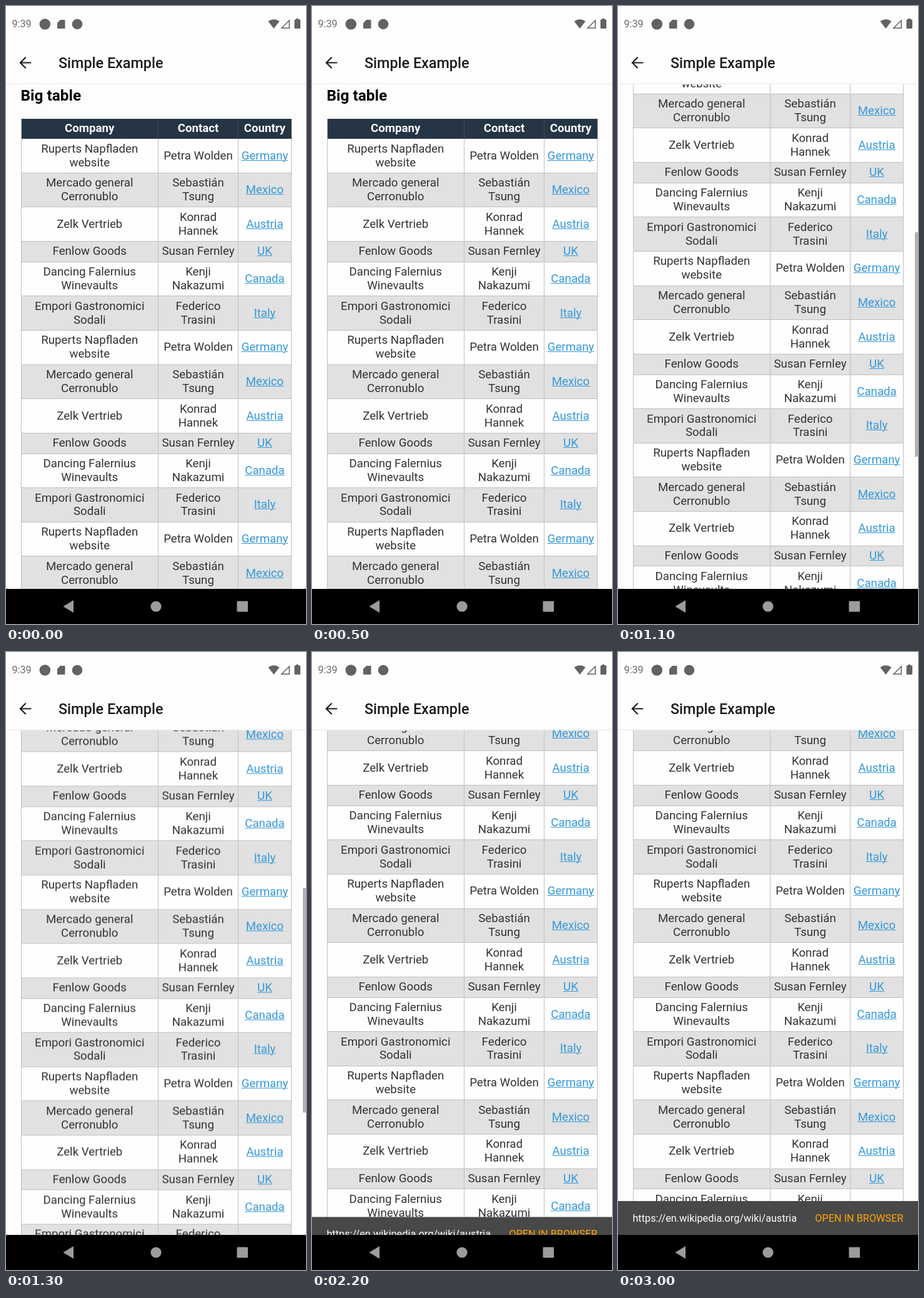
An HTML page that plays this animation: 480 px wide and 986 px high, repeating every 3100 ms.

```html
<!DOCTYPE html>
<html lang="en">
<head>
<meta charset="utf-8">
<title>Simple Example</title>
<style>
  html, body { margin: 0; width: 100%; height: 100%; overflow: hidden; }
  body { font-family: Roboto, sans-serif; background: #fefefe; }
  #stage { position: relative; width: 480px; height: 986px; overflow: hidden; }
  #stage > *, #view > * { position: absolute; }
  #view { left: 0; top: 123px; width: 480px; height: 807px; overflow: hidden; background: #fdfdfd; }
  #page { left: 0; top: 0; width: 480px; will-change: transform; }
  h2 { position: absolute; margin: 0; left: 23.4px; top: 6px; font-size: 24.4px; line-height: 28px; color: #000; white-space: nowrap; }
  #table { position: absolute; left: 23.5px; top: 56.5px; width: 433.5px; box-sizing: border-box; border: solid #c0c0c0; border-width: 0 0 0 1px; }
  .row { display: grid; grid-template-columns: 219.5px 128px 85px; height: 54.62px; background: #fefefe; }
  .row.short { height: 32.72px; }
  .row.alt { background: #e1e1e1; }
  .row.head { background: #253546; color: #fff; font-weight: 700; }
  .cell { display: flex; align-items: center; justify-content: center; text-align: center; white-space: pre;
    box-sizing: border-box; border: solid #c0c0c0; border-width: 0 1px 1px 0; padding-top: 1px;
    font-size: 18.69px; line-height: 21.9px; color: #333; }
  .head .cell { color: inherit; border-color: #3f4a55; }
  .cell u { color: #3498db; text-decoration-thickness: 1px; }
  #thumb { left: 475px; top: 182px; width: 5px; height: 358px; background: #b2b2b2; }
  #snack { left: 0; top: 753px; width: 480px; height: 54px; background: #484848; font-size: 16.3px; line-height: 55px; color: #fff; white-space: nowrap; }
  #snack b { position: absolute; right: 23.5px; font-weight: 400; color: #ffa500; }
  #snack span { position: absolute; left: 23.4px; }
  #bar { left: 0; top: 0; width: 480px; height: 123px; background: #fefefe; border-bottom: 2px solid #f2f2f2; }
  #time { left: 9.5px; top: 19px; font-size: 16.2px; line-height: 20px; color: #6c6c6c; }
  #title { left: 84px; top: 77px; font-size: 23.36px; line-height: 28px; font-weight: 500; color: #1c1c1e; white-space: nowrap; }
  #nav { left: 0; top: 930px; width: 480px; height: 56px; background: #000; }
  svg { left: 0; top: 0; }
</style>
</head>
<body>
<div id="stage">
  <div id="view">
    <div id="page"><h2>Big table</h2><div id="table"></div></div>
    <div id="thumb"></div>
    <div id="snack"><span>https://en.wikipedia.org/wiki/austria</span><b>OPEN IN BROWSER</b></div>
  </div>
  <div id="bar"></div>
  <div id="time">9:39</div>
  <div id="title">Simple Example</div>
  <div id="nav"></div>
  <svg width="480" height="986">
    <g fill="#626262">
      <circle cx="62.3" cy="29" r="8.8"/>
      <path d="M87 22h6.5q1 0 1 1v12q0 1-1 1h-10.5q-1 0-1-1v-8z"/>
      <circle cx="114" cy="29" r="8.3"/>
      <path d="M419.5 24.5Q428.5 18 437.5 24.5L428.5 36z"/>
      <path d="M464 21.5v-1.5h4v1.5h2q1 0 1 1v12.5q0 1-1 1h-7.5q-1 0-1-1v-12.5q0-1 1-1z"/>
    </g>
    <path d="M441 35.3L453.3 23v12.3z" fill="none" stroke="#626262" stroke-width="1.5"/>
    <path d="M40.3 90.5H23M31.7 81.7L22.9 90.5L31.7 99.3" fill="none" stroke="#1c1c1e" stroke-width="2.2"/>
    <g fill="#9c9c9c">
      <path d="M91.5 958L108 948v20z"/>
      <circle cx="240" cy="958" r="8.6"/>
      <rect x="369.5" y="949.5" width="17.5" height="17" rx="1"/>
    </g>
  </svg>
</div>
<script>
const LOOP = 3100, STEP = 100;
const $ = id => document.getElementById(id);

const rows = [
  ['Ruperts Napfladen\nwebsite', 'Petra Wolden', 'Germany'],
  ['Mercado general\nCerronublo', 'Sebastián\nTsung', 'Mexico'],
  ['Zelk Vertrieb', 'Konrad\nHannek', 'Austria'],
  ['Fenlow Goods', 'Susan Fernley', 'UK'],
  ['Dancing Falernius\nWinevaults', 'Kenji\nNakazumi', 'Canada'],
  ['Empori Gastronomici\nSodali', 'Federico\nTrasini', 'Italy']
];

function addRow(cells, kind, link) {
  const row = document.createElement('div');
  row.className = 'row ' + kind;
  cells.forEach((text, i) => {
    const cell = document.createElement('div');
    const label = document.createElement(link && i === 2 ? 'u' : 'span');
    cell.className = 'cell';
    label.textContent = text;
    cell.append(label);
    row.append(cell);
  });
  $('table').append(row);
}

addRow(['Company', 'Contact', 'Country'], 'head short', false);
for (let i = 0; i < 18; i++) {
  const cells = rows[i % 6];
  const short = !cells.join('').includes('\n');
  addRow(cells, (i % 2 ? 'alt ' : '') + (short ? 'short' : ''), true);
}

const SCROLL = { start: 827, length: 521, distance: 163 };
const FADE = { start: SCROLL.start + SCROLL.length + 300, length: 250 };
const SNACK = { start: 2150, length: 225, height: 54 };

const progress = (t, { start, length }) => Math.min(1, Math.max(0, (t - start) / length));
const easeOut = (p, power) => 1 - (1 - p) ** power;
const shiftY = (id, y) => { $(id).style.transform = `translateY(${y}px)`; };

function draw(now) {
  const t = Math.floor(now % LOOP / STEP) * STEP;
  const y = SCROLL.distance * easeOut(progress(t, SCROLL), 2);
  shiftY('page', -y);
  shiftY('thumb', y * 0.4436);
  $('thumb').style.opacity = y > 0 ? 1 - progress(t, FADE) : 0;
  shiftY('snack', SNACK.height * (1 - easeOut(progress(t, SNACK), 3)));
}

function tick() {
  draw(performance.now());
  requestAnimationFrame(tick);
}
tick();
</script>
</body>
</html>
```
